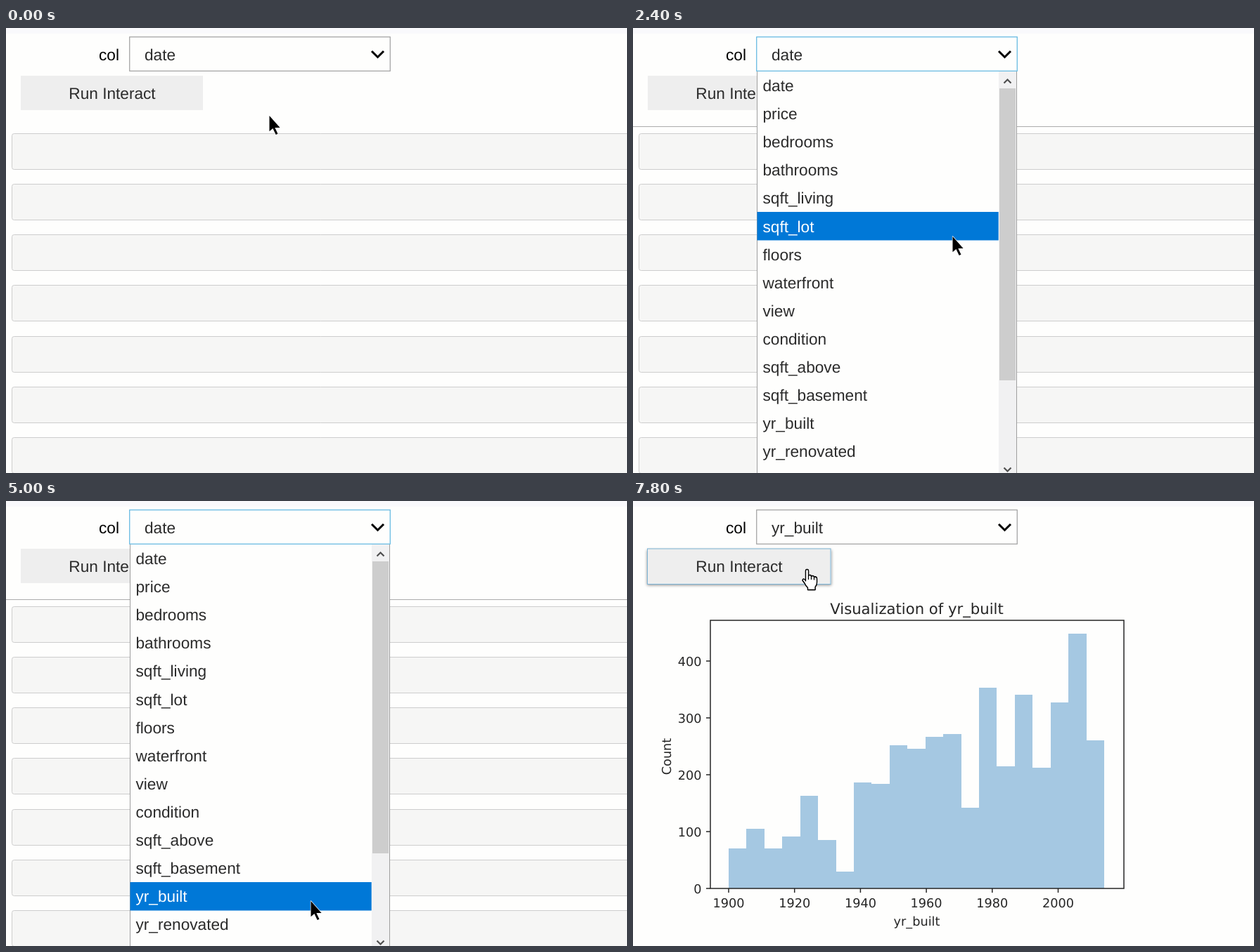
Write an HTML page with a canvas that moves like this. It is 883x634 px and loops after 8000 ms.

```html
<!DOCTYPE html>
<html lang="en">
<head>
<meta charset="utf-8">
<title>Column histogram widget</title>
<style>
  html, body { margin: 0; width: 100%; height: 100%; overflow: hidden; background: #fefefd; }
  canvas { display: block; }
</style>
</head>
<body>
<canvas id="stage" width="883" height="634"></canvas>
<script>
const W = 883, H = 634, LOOP = 8000, STEP = 200;
const OPEN = 1000, CLOSE = 5600, HOVER = 6400, CLICK = 6800, PLOT = 7200;
const UI = '22.65px "Liberation Sans", Arial, sans-serif';
const PLOT_FONT = '"DejaVu Sans", sans-serif';
const ROW = 40.1, LIST_TOP = 61.5;

const options = ['date', 'price', 'bedrooms', 'bathrooms', 'sqft_living', 'sqft_lot',
  'floors', 'waterfront', 'view', 'condition', 'sqft_above', 'sqft_basement',
  'yr_built', 'yr_renovated'];

// Top edge of each histogram bar
const barTops = [495, 467, 495, 478, 420, 483, 528, 401, 403, 348, 353,
  336, 332, 437, 266, 378, 276, 380, 287, 189, 341];

// Pointer tip: time, x, y
const path = [
  [0, 374, 125], [200, 378, 121], [800, 482, 42], [1200, 480, 44], [1600, 468, 109],
  [2400, 454, 297], [3200, 459, 369], [5000, 433, 570], [5400, 433, 570],
  [5600, 427, 545], [6000, 350, 229], [6200, 290, 150], [6400, 248, 108],
  [6600, 245.5, 104], [7200, 245.5, 104], [7600, 247.5, 97], [8000, 247.5, 97]
];

const arrow = new Path2D('M.5 0V22.3L5.4 17.9L9.7 27L12.5 25.7L8.4 16.9H15.6Z');
const hand = new Path2D('M-2 17V2.5Q-2 .5 0 .5Q2 .5 2 2.5V10Q2 8.5 4 8.5Q6 8.5 6 11' +
  'Q6.3 9.5 8 9.5Q10 9.8 10 12Q10.5 11 12 11Q14 11.5 14 13.5V19Q14 23 11.5 25.5V29.5H1V26.5' +
  'Q-2 23.5 -3.5 20L-6.2 16.5Q-6.5 14.5 -4.8 14.2Q-3.5 14.2 -2 17Z');
const knuckles = new Path2D('M2 10V15M6 11V15M10 12V15.5');

const ctx = document.getElementById('stage').getContext('2d');
ctx.textRendering = 'geometricPrecision';

function rect(x, y, w, h, color) {
  ctx.fillStyle = color;
  ctx.fillRect(x, y, w, h);
}

function frame(x, y, w, h, color, width = 1) {
  ctx.strokeStyle = color;
  ctx.lineWidth = width;
  ctx.strokeRect(x, y, w, h);
}

function line(points, color, width) {
  ctx.beginPath();
  points.forEach(([x, y]) => ctx.lineTo(x, y));
  ctx.strokeStyle = color;
  ctx.lineWidth = width;
  ctx.stroke();
}

function text(str, x, y, font = UI, color = '#2b2b2b', align = 'left') {
  ctx.font = font;
  ctx.fillStyle = color;
  ctx.textAlign = align;
  ctx.fillText(str, x, y);
}

function pointerAt(t) {
  const i = path.findIndex(p => p[0] > t);
  const [t0, x0, y0] = path[i - 1], [t1, x1, y1] = path[i];
  const k = (t - t0) / (t1 - t0);
  return [x0 + (x1 - x0) * k, y0 + (y1 - y0) * k];
}

function drawCells() {
  ctx.lineWidth = 1;
  for (let i = 0; i < 7; i++) {
    ctx.beginPath();
    ctx.roundRect(8.5, Math.floor(150.8 + 72.06 * i) + 0.5, W, 51, 3);
    ctx.fillStyle = '#f6f6f5';
    ctx.fill();
    ctx.strokeStyle = '#cdcdcd';
    ctx.stroke();
  }
}

function drawSelect(t) {
  const focused = t >= OPEN && t < CLICK;
  text('col', 132, 46, UI, '#000');
  rect(175, 12, 372, 50, '#fefefd');
  frame(175.75, 12.75, 370.5, 48.5, focused ? '#5cb5e0' : '#9e9e9e', 1.2);
  text(t < CLOSE ? 'date' : 'yr_built', 197, 46);
  line([[520, 33], [528.5, 41.5], [537, 33]], '#000', 3);
}

function drawButton(t) {
  ctx.save();
  if (t >= HOVER) {
    ctx.shadowColor = 'rgba(0,0,0,.45)';
    ctx.shadowBlur = 4;
    ctx.shadowOffsetY = 2;
  }
  if (t < HOVER) rect(21, 68, 259, 49, '#eeeeee');
  else rect(20, 68, 262, 50, '#eeeeee');
  ctx.restore();
  if (t >= CLICK) frame(20.5, 68, 260.5, 50.5, '#7db4d6');
  text('Run Interact', 151, 101, UI, '#2b2b2b', 'center');
}

function drawList(y) {
  const active = Math.max(0, Math.min(13, Math.floor((y - LIST_TOP - 9.5) / ROW)));
  rect(176, 62, 370, H, '#fefefd');
  line([[176.5, 62], [176.5, H]], '#9e9e9e', 1);
  line([[545.5, 62], [545.5, H]], '#9e9e9e', 1);
  const top = Math.round(LIST_TOP + ROW * active);
  rect(176.5, top, 343.2, 40.5, '#0078d7');
  options.forEach((name, i) =>
    text(name, 184.5, 90 + ROW * i, UI, i === active ? '#fff' : '#2b2b2b'));
  rect(520, 62, 25, H, '#f1f1f2');
  rect(521, 86, 23, 416, '#cdcdcd');
  line([[527.5, 78.5], [532.5, 73.5], [537.5, 78.5]], '#505050', 2.2);
  line([[527.5, 626.5], [532.5, 631.5], [537.5, 626.5]], '#505050', 2.2);
}

function drawPlot() {
  const ink = '#262626', label = '17.7px ' + PLOT_FONT;
  const left = 136, barW = 534 / barTops.length, base = 552;
  const edge = i => Math.round(left + barW * i);
  barTops.forEach((y, i) => rect(edge(i), y, edge(i + 1) - edge(i), base - y, '#a5c8e2'));
  frame(110, 170, 588, 382, ink, 1.5);
  for (let i = 0; i < 5; i++) {
    const y = base - 81 * i;
    line([[104, y], [110, y]], ink, 1.5);
    text(String(100 * i), 97.5, y + 6.5, label, ink, 'right');
  }
  for (let i = 0; i < 6; i++) {
    const x = left + 93.7 * i;
    line([[x, base], [x, base + 6]], ink, 1.5);
    text(String(1900 + 20 * i), x, 579, label, ink, 'center');
  }
  text('Visualization of yr_built', 403.5, 160.5, '21.2px ' + PLOT_FONT, ink, 'center');
  text('yr_built', 403.5, 605, label, ink, 'center');
  ctx.save();
  ctx.translate(53.5, 364);
  ctx.rotate(-Math.PI / 2);
  text('Count', 0, 0, label, ink, 'center');
  ctx.restore();
}

function drawPointer(t, x, y) {
  const onButton = t >= HOVER;
  ctx.save();
  ctx.translate(x, y);
  ctx.lineJoin = 'round';
  ctx.lineWidth = 1.3;
  ctx.strokeStyle = onButton ? '#000' : '#fff';
  ctx.fillStyle = onButton ? '#fff' : '#000';
  ctx.stroke(onButton ? hand : arrow);
  ctx.fill(onButton ? hand : arrow);
  if (onButton) {
    ctx.stroke(hand);
    ctx.stroke(knuckles);
  }
  ctx.restore();
}

function draw(t) {
  const [x, y] = pointerAt(t);
  rect(0, 0, W, H, '#fefefd');
  rect(0, 0, W, 8, '#f9f9fc');
  if (t < PLOT) drawCells();
  else drawPlot();
  if (t >= OPEN && t < PLOT) line([[0, 140.5], [W, 140.5]], '#ababab', 1);
  drawButton(t);
  drawSelect(t);
  if (t >= OPEN && t < CLOSE) drawList(y);
  drawPointer(t, x, y);
}

function tick() {
  const t = performance.now() % LOOP;
  draw(Math.floor(t / STEP) * STEP);
  requestAnimationFrame(tick);
}
tick();
</script>
</body>
</html>
```
